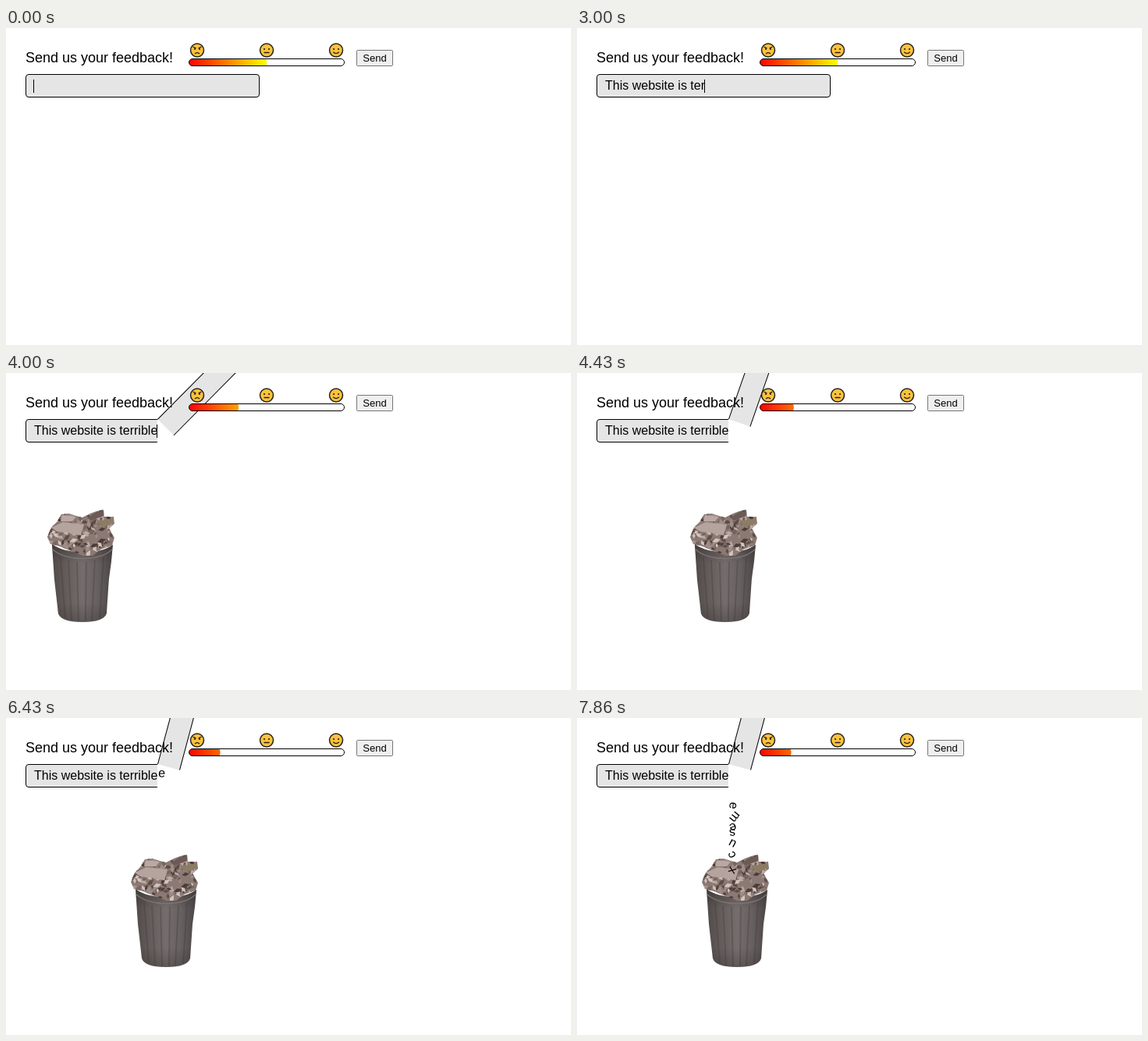
These frames come from a looping animation (724x406 px, 8000 ms). An HTML page:

```html
<!DOCTYPE html>
<html lang="en">
<head>
<meta charset="utf-8">
<title>Feedback form</title>
<style>
  html, body { margin: 0; width: 100%; height: 100%; overflow: hidden; background: #fff; }
  svg { display: block; width: 100vw; height: 100vh; }
  text { font-family: "Liberation Sans", Arial, sans-serif; font-size: 16px; fill: #000; }
  .panel { fill: #e5e5e5; }
  .edge { fill: none; stroke: #000; }
  .face { fill: none; stroke: #241f1a; stroke-width: 1.3; stroke-linecap: round; }
  .rib { fill: none; stroke: #3f3a39; stroke-width: 1.8; opacity: .35; }
</style>
</head>
<body>
<svg viewBox="0 0 724 406">
  <defs>
    <linearGradient id="mood" gradientUnits="userSpaceOnUse" x1="234" x2="434">
      <stop stop-color="#f00"/><stop offset=".5" stop-color="#ff0"/><stop offset="1" stop-color="#0f0"/>
    </linearGradient>
    <linearGradient id="metal">
      <stop stop-color="#4f4948"/><stop offset=".2" stop-color="#615a59"/>
      <stop offset=".5" stop-color="#746d6c"/><stop offset=".75" stop-color="#676060"/>
      <stop offset="1" stop-color="#4a4444"/>
    </linearGradient>
    <linearGradient id="shade" x2="0" y2="1">
      <stop stop-color="#2a2524" stop-opacity=".4"/><stop offset=".25" stop-color="#2a2524" stop-opacity="0"/>
      <stop offset=".75" stop-color="#2a2524" stop-opacity="0"/><stop offset="1" stop-color="#2a2524" stop-opacity=".3"/>
    </linearGradient>
    <clipPath id="barClip"><rect x="234.5" y="39.5" width="199" height="9" rx="4.5"/></clipPath>
    <path id="heap" d="M160 210 165 198 172 191 178 181 188 180 197 183 205 185 215 180 223 177 232 175 233 184 245 184 246 193 239 199 246 211 243 221 228 226 218 234 206 234 190 228 176 222 164 219Z"/>
    <clipPath id="heapClip"><use href="#heap"/></clipPath>
    <path id="body" d="M166 219 C182 232 226 234 244 220 L242 242 239 264 236 308 Q232 319 205 319 Q178 319 174 308 L169 264Z"/>
    <g id="head">
      <circle r="8.5" fill="#fbc23c" stroke="#241f1a" stroke-width="1.5"/>
      <circle cx="-3" cy="-1.5" r="1.1" fill="#241f1a"/><circle cx="3" cy="-1.5" r="1.1" fill="#241f1a"/>
    </g>
  </defs>

  <g id="flap">
    <path class="panel" d="M194 59H321a4 4 0 0 1 4 4V85a4 4 0 0 1-4 4H194Z"/>
    <path class="edge" d="M194 59.5H321a3.5 3.5 0 0 1 3.5 3.5V85a3.5 3.5 0 0 1-3.5 3.5H194"/>
  </g>
  <path class="panel edge" style="fill:#e5e5e5" d="M194 59.5H29a3.5 3.5 0 0 0-3.5 3.5V85a3.5 3.5 0 0 0 3.5 3.5H194"/>
  <text id="typed" x="36" y="79" xml:space="preserve"></text>
  <rect id="caret" y="66" width="1" height="17"/>

  <text x="25" y="44" style="font-size:18px">Send us your feedback!</text>
  <rect x="234.5" y="39.5" width="199" height="9" rx="4.5" fill="#fff"/>
  <rect id="fill" x="234" y="39" height="10" rx="4" fill="url(#mood)" clip-path="url(#barClip)"/>
  <rect x="234.5" y="39.5" width="199" height="9" rx="4.5" class="edge"/>

  <g transform="translate(245 28.5)"><use href="#head"/><path class="face" d="M-5-4.3-2-2.6M5-4.3 2-2.6M-2.6 4.2Q0 2 2.6 4.2"/></g>
  <g transform="translate(334 28.5)"><use href="#head"/><path class="face" d="M-3 3H3"/></g>
  <g transform="translate(423 28.5)"><use href="#head"/><path class="face" d="M-3.5 2.6Q0 5.6 3.5 2.6"/></g>

  <rect x="449.5" y="28.5" width="46" height="20" rx="1" fill="#efefef" stroke="#767676"/>
  <text x="472.5" y="43" text-anchor="middle" style="font-size:13px">Send</text>

  <g id="bin">
    <use href="#body" fill="url(#metal)"/>
    <path class="rib" d="M177 236 183 314M187 240 191 317M198 242 200 318M210 242 209 318M221 240 217 317M232 236 227 315"/>
    <use href="#body" fill="url(#shade)"/>
    <path d="M167 226C183 241 226 242 243 226" fill="none" stroke="#7d7573" stroke-width="1.2"/>
    <use href="#heap" fill="#8b7974"/>
    <g id="scraps" clip-path="url(#heapClip)"></g>
    <path d="M165 198 180 191 207 194 203 208 190 205 172 203Z" fill="#b5a39e"/>
    <path d="M177 190 179 182 197 184 192 190Z" fill="#b9a8a3"/>
    <path d="M211 185 223 178 232 176 232 183 216 189Z" fill="#6b5a55"/>
    <path d="M224 190 244 186 245 192 230 198Z" fill="#8d7c64"/>
  </g>
  <g id="falling"></g>
</svg>
<script>
const LOOP = 8000, OPEN_AT = 3582, OPEN_MS = 1200, FALL_MS = 1200, BLINK = 530;
const message = "This website is terrible";
const keyTimes = [860, 1140, 1251, 1362, 1473, 1584, 1695, 1806, 1917, 2028, 2140, 2230,
  2290, 2460, 2510, 2570, 2860, 2930, 3000, 3290, 3360, 3430, 3500, 3570];
const overflow = "whatexcuseme";
const overflowTimes = [4855, 4938, 5039, 5177, 6380, 6804, 6908, 6991, 7074, 7118, 7205, 7309];

const $ = id => document.getElementById(id);
const add = (parent, tag, attrs, text = "") => {
  const node = document.createElementNS("http://www.w3.org/2000/svg", tag);
  for (const name in attrs) node.setAttribute(name, attrs[name]);
  node.textContent = text;
  return parent.appendChild(node);
};
const clamp = v => Math.min(1, Math.max(0, v));

// cubic-bezier(.25, .1, .25, 1), solved by bisection
function ease(x) {
  if (x <= 0 || x >= 1) return clamp(x);
  const curve = (a, b, s) => 3 * a * s * (1 - s) ** 2 + 3 * b * s * s * (1 - s) + s ** 3;
  let lo = 0, hi = 1;
  for (let i = 0; i < 24; i++) {
    const mid = (lo + hi) / 2;
    if (curve(.25, .25, mid) < x) lo = mid; else hi = mid;
  }
  return curve(.1, 1, lo);
}

let seed = 11;
const random = () => (seed = seed * 16807 % 2147483647) / 2147483647;
const paper = ["#d3c3be", "#bba9a4", "#a08d88", "#78655f", "#4c3d39", "#5d4c47"];
for (let i = 0; i < 170; i++) {
  const x = 160 + random() * 86, y = 176 + random() * 58, turn = random() * 6.28;
  const size = 2 + random() * 4;
  const points = [0, 1, 2, 3].map(k => {
    const angle = turn + k * 1.57, r = size * (k % 2 ? .5 : 1);
    return [x + r * Math.cos(angle), y + r * Math.sin(angle)].map(v => v.toFixed(1));
  });
  add($("scraps"), "polygon", { points: points.join(" "), fill: paper[Math.floor(random() * paper.length)] });
}

const letters = [...overflow].map((char, i) => {
  const node = add($("falling"), "text", { y: 4, "text-anchor": "middle" }, char);
  return { node, start: overflowTimes[i], x: 195 + node.getComputedTextLength() / 2 };
});

function draw(t) {
  const count = keyTimes.filter(k => k <= t).length;
  const typed = message.slice(0, count);
  if ($("typed").textContent !== typed) $("typed").textContent = typed;

  const lastKey = count ? keyTimes[count - 1] : -310;
  const caretOn = Math.floor((t - lastKey) / BLINK) % 2 === 0 && t < overflowTimes[0];
  $("caret").setAttribute("x", 35 + Math.floor($("typed").getComputedTextLength()));
  $("caret").setAttribute("visibility", caretOn ? "visible" : "hidden");

  const p = ease((t - OPEN_AT) / OPEN_MS);
  $("flap").setAttribute("transform", `rotate(${-75 * p} 194 59)`);
  $("fill").setAttribute("width", 100 - 59.5 * p);
  $("bin").setAttribute("transform", `translate(${-270 * (1 - p)} 0)`);

  for (const { node, start, x } of letters) {
    const age = (t - start) / FALL_MS;
    const drop = clamp(age) ** 1.7;
    node.setAttribute("visibility", age >= 0 && age < 1 ? "visible" : "hidden");
    node.setAttribute("transform", `translate(${x} ${71 + 154 * drop}) rotate(${360 * drop})`);
  }
}

const begin = performance.now();
function frame() {
  draw((performance.now() - begin) % LOOP);
  requestAnimationFrame(frame);
}
frame();
</script>
</body>
</html>
```
